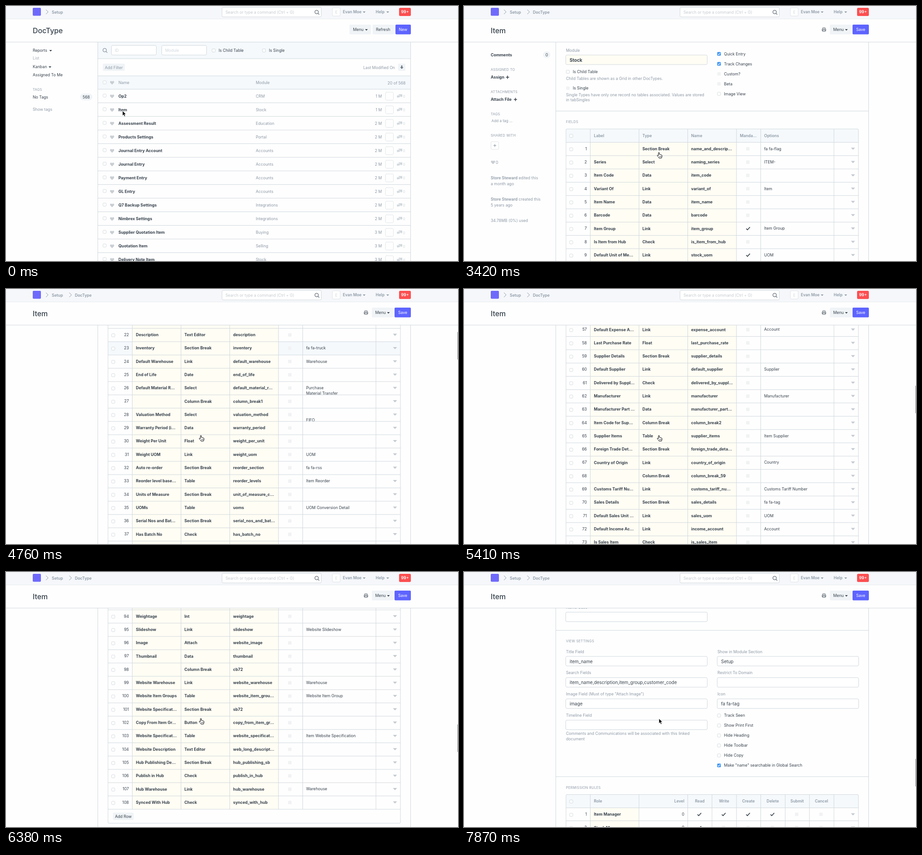
Animation, 997 px wide and 562 px high, one loop 8 s. Source, as an HTML page:

```html
<!DOCTYPE html>
<html lang="en">
<head>
<meta charset="utf-8">
<title>Item list and form</title>
<style>
html, body { margin: 0; width: 100%; height: 100%; overflow: hidden; background: #fefefe; }
svg { display: block; }
text { font-family: Inter, "Open Sans", sans-serif; white-space: pre; }
</style>
</head>
<body>
<svg id="stage" width="997" height="562" viewBox="0 0 997 562"></svg>
<script>
const INK = '#36414c', MUTED = '#8d99a6', PALE = '#d1d8dd', TINT = '#f5f9fc', GREY = '#f0f4f7', CREAM = '#fffdf4', BLUE = '#5e64ff';
const DURATION = 8000, ROW = 29.3, TABLE_TOP = 300.5, LOWER_TOP = 3608;

// y is the middle of the capital letters
function text(x, y, str, { fill = INK, size = 8.7, weight = 400, anchor = 'start', space = 0 } = {}) {
  return `<text x="${x}" y="${(y + size * .364).toFixed(2)}" font-size="${size}" font-weight="${weight}" fill="${fill}" text-anchor="${anchor}" letter-spacing="${space}">${str}</text>`;
}
const muted = (x, y, str, more) => text(x, y, str, { fill: MUTED, ...more });
const bold = (x, y, str, more) => text(x, y, str, { weight: 700, size: 8.85, ...more });
const caps = (x, y, str) => muted(x, y, str, { size: 7.4, space: .35 });
const rect = (x, y, w, h, fill = 'none', stroke = 'none', r = 0, more = '') =>
  `<rect x="${x}" y="${y}" width="${w}" height="${h}" rx="${r}" fill="${fill}" stroke="${stroke}" ${more}/>`;
const path = (x, y, d, fill = 'none', stroke = 'none', width = 1) =>
  `<path transform="translate(${x} ${y})" d="${d}" fill="${fill}" stroke="${stroke}" stroke-width="${width}"/>`;
const hLine = (y, x1 = 203, x2 = 893, color = PALE) => path(x1, y, `M0 0H${x2 - x1}`, 'none', color);
const vLine = (x, y1, y2) => path(x, y1, `M0 0V${y2 - y1}`, 'none', PALE);
const group = (id, body, more = '') => `<g id="${id}" ${more}>${body}</g>`;

const caret = (x, y, fill = INK) => path(x, y, 'M-3-1.5H3L0 1.8Z', fill);
const chevron = x => path(x, 13, 'M-2.5-5L2.5 0L-2.5 5', 'none', MUTED);
const plus = (x, y, fill = INK) => path(x, y, 'M-3.5 0H3.5M0-3.5V3.5', 'none', fill, 1.6);
const tick = (x, y) => path(x, y, 'M-4 .3L-1.2 3L4.2-3', 'none', INK, 1.7);
const box = (x, y) => rect(x - 3.5, y - 3.5, 7, 7, '#fff', '#cbd1d6', 1.5, 'stroke-width=".8"');
const offBox = (x, y) => rect(x - 3.8, y - 3.8, 7.6, 7.6, '#f1f2f3', 'none', 1.5);
const onBox = (x, y) => rect(x - 4, y - 4, 8, 8, '#3b94f5', 'none', 1.5) + path(x, y, 'M-2.2 .2L-.6 1.9L2.4-1.9', 'none', '#fff', 1.2);
const heart = (x, y) => path(x, y, 'M0 4.3L-4 .2C-6-2.4-2.4-5.6 0-2.6C2.4-5.6 6-2.4 4 .2Z', '#c8ced3');
const glass = (x, y, color = '#6c7680') => path(x, y, 'M2.3 2.3L5 5M3.1-.8A3.9 3.9 0 1 1-4.7-.8A3.9 3.9 0 1 1 3.1-.8', 'none', color, 1.3);
const bubbles = (x, y) => path(x, y, 'M-2-4H6V1H4.5V3L2.5 1H-2Z', PALE) + path(x, y, 'M-6-1.5H1V3H-2.5L-4.5 5V3H-6Z', PALE, '#fff', .6);
const button = (x, y, w, h, label, tx, fill = GREY, color = INK) =>
  rect(x, y, w, h, fill, 'none', 2) + text(tx, y + h / 2, label, { fill: color });
const input = (x, y, w, value = '', fill = '#fff', weight = 400) =>
  rect(x, y, w, 21, fill, PALE, 2.5) + text(x + 8.5, y + 11, value, { size: 9.95, weight });
const field = (x, y, label, value) => muted(x, y, label) + input(x - .5, y + 10.5, 312, value);
const check = (x, y, label, mark = box) => mark(x, y) + text(x + 11, y, label);

function navbar() {
  return rect(0, 0, 997, 29, '#f5f7fa') + hLine(28.5, 0, 997, '#e9edf1')
    + rect(59, 4, 18, 17.5, '#6f69fb', 'none', 2)
    + chevron(90.5) + muted(101, 13.5, 'Setup', { weight: 600 })
    + group('crumb', chevron(142) + muted(152, 13.5, 'DocType', { weight: 600 }))
    + rect(476.5, 3, 219, 21, '#fff', PALE, 2.5) + text(484, 13.5, 'Search or type a command (Ctrl + G)', { fill: '#c4cad0' }) + glass(686, 14)
    + rect(720, 4, 17, 18, '#fff', '#dfe3e6', 2) + text(728.5, 13.5, 'E', { fill: PALE, anchor: 'middle' })
    + muted(743, 13, 'Evan Moe', { weight: 600 }) + caret(790, 13.5, MUTED)
    + muted(815.5, 13, 'Help', { weight: 600 }) + caret(842, 13.5, MUTED)
    + rect(867, 4, 26, 18, '#fc4f51', 'none', 2.5) + text(880, 13, '99+', { fill: '#fff', weight: 600, anchor: 'middle' });
}

const title = str => text(59, 54.5, str, { size: 15.8, weight: 500 });

function pageHead() {
  return rect(0, 28, 997, 51.5, '#fefefe') + hLine(79.5, 0, 997)
    + group('listHead', title('DocType')
      + button(757.5, 41, 47.5, 21.5, 'Menu', 765.5) + caret(795, 52.5)
      + button(808.5, 41, 47, 21.5, 'Refresh', 816)
      + button(859, 41, 34, 21.5, 'New', 866.5, BLUE, '#fff'))
    + group('formHead', title('Item')
      + path(794, 52, 'M-2.5-1V-4H2.5V-1M-2.5 2.5H-4V-1H4V2.5H2.5M-2.5 1H2.5V4H-2.5Z', 'none', '#5f6973', 1.1)
      + button(807, 41, 46.5, 21.5, 'Menu', 814.5) + caret(843.5, 52.5)
      + button(857, 41, 36, 21.5, 'Save', 865, BLUE, '#fff'));
}

const LIST = `Op2|CRM|1
Item|Stock|1
Assessment Result|Education|2
Products Settings|Portal|2
Journal Entry Account|Accounts|2
Journal Entry|Accounts|2
Payment Entry|Accounts|2
GL Entry|Accounts|2
Q7 Backup Settings|Integrations|2
Nimbrex Settings|Integrations|2
Supplier Quotation Item|Buying|3
Quotation Item|Selling|3
Delivery Note Item|Stock|3`.split('\n').map(line => line.split('|'));

function listPage() {
  const side = text(59, 97.5, 'Reports') + caret(98.5, 98.5) + muted(59, 115, 'List', { fill: '#a3adb7' })
    + text(59, 134, 'Kanban') + caret(97, 134.5) + text(59, 151.5, 'Assigned To Me')
    + caps(59, 184, 'TAGS') + text(59, 200.5, 'No Tags')
    + rect(163.5, 193, 27, 15, GREY, 'none', 7.5) + text(177, 200.5, '568', { anchor: 'middle' })
    + muted(59, 227.5, 'Show tags');
  const filters = rect(203, 80, 690, 36, TINT) + glass(218.5, 98, MUTED)
    + rect(232.5, 87, 99, 21, '#fff', PALE, 2.5) + text(240, 98, 'ID', { fill: PALE })
    + rect(343.5, 87, 99, 21, '#fff', PALE, 2.5) + text(351, 98, 'Module', { fill: PALE })
    + check(458, 98, 'Is Child Table') + check(569, 98, 'Is Single') + hLine(116)
    + rect(213.5, 127, 48.5, 16, GREY, 'none', 2) + muted(218, 135.5, 'Add Filter')
    + muted(858, 135.5, 'Last Modified On', { anchor: 'end' })
    + rect(865, 127, 16, 16, GREY, 'none', 2) + path(873, 135, 'M-1.3-4H1.3V-.3H3.8L0 3.8L-3.8-.3H-1.3Z', '#6c7680');
  const header = rect(203, 154, 690, 29, TINT) + hLine(154) + hLine(183.3) + box(217.5, 168.3) + heart(234, 169)
    + muted(248, 169, 'Name') + muted(551, 169, 'Module') + muted(881.5, 169.5, '20 of 568', { anchor: 'end' });
  const rows = LIST.map(([name, module, age], i) => {
    const y = 198.5 + 30.03 * i;
    return box(217.5, y - 1) + heart(234, y + .5) + bold(248, y + .3, name) + muted(551, y + .3, module)
      + muted(829, y + .3, age + ' M', { anchor: 'end' })
      + rect(837, y - 8.5, 17.5, 17.5, 'none', PALE, 2.5, 'stroke-dasharray="2 1"')
      + bubbles(868, y) + text(878, y + .8, '0', { fill: PALE, size: 8, anchor: 'middle' }) + hLine(y + 14.8);
  }).join('');
  return side + filters + header + group('listHover', rect(203, 213.8, 690, 29, TINT)) + rows + vLine(202.5, 80, 562) + vLine(892.5, 80, 562);
}

const TYPES = { S: 'Section Break', C: 'Column Break', L: 'Link', D: 'Data', K: 'Check', T: 'Table', F: 'Float', O: 'Select', E: 'Text Editor', M: 'Currency', I: 'Int', A: 'Attach', G: 'Attach Image', B: 'Button', Y: 'Date', X: 'Small Text' };

// label|type|name|options; an empty name follows from the label, "/" breaks a line
const FIELDS = `|S|name_and_descrip...|fa fa-flag
Series|O|naming_series|ITEM-
Item Code|D
Variant Of|L||Item
Item Name|D
Barcode|D
Item Group|L||Item Group
Is Item from Hub|K
Default Unit of Me...|L|stock_uom|UOM
|C|column_break0
Disabled|K
Maintain Stock|K|is_stock_item
Include Item In M...|K|include_item_in_m...
Opening Stock|F
Valuation Rate|M
Standard Selling ...|M|standard_rate
Is Fixed Asset|K
Asset Category|L||Asset Category
Image|G
Description|S|section_break_11
Brand|L||Brand
Description|E
Inventory|S||fa fa-truck
Default Warehouse|L||Warehouse
End of Life|Y
Default Material R...|O|default_material_r...|Purchase/Material Transfer
|C|column_break1
Valuation Method|O||/FIFO
Warranty Period (i...|D|warranty_period
Weight Per Unit|F
Weight UOM|L||UOM
Auto re-order|S|reorder_section|fa fa-rss
Reorder level base...|T|reorder_levels|Item Reorder
Units of Measure|S|unit_of_measure_c...
UOMs|T||UOM Conversion Detail
Serial Nos and Bat...|S|serial_nos_and_bat...
Has Batch No|K
Automatically Crea...|K|create_new_batch
Batch Number Series|D
Retain Sample|K
Max Sample Quan...|I|sample_quantity
|C|column_break_37
Has Serial No|K
Serial Number Ser...|D|serial_no_series
Variants|S|variants_section
Has Variants|K
Variant Based On|O||Item Attribute
Attributes|T||Item Variant Attribute
Purchase Details|S||fa fa-shopping-cart
Is Purchase Item|K
Default Purchase ...|L|purchase_uom|UOM
Minimum Order Qty|F|min_order_qty
Safety Stock|F
|C|purchase_details_cb
Lead Time in days|I|lead_time_days
Default Buying Co...|L|buying_cost_center|Cost Center
Default Expense A...|L|expense_account|Account
Last Purchase Rate|F
Supplier Details|S
Default Supplier|L||Supplier
Delivered by Suppl...|K|delivered_by_suppl...
Manufacturer|L||Manufacturer
Manufacturer Part ...|D|manufacturer_part...
Item Code for Sup...|C|column_break2
Supplier Items|T||Item Supplier
Foreign Trade Det...|S|foreign_trade_deta...
Country of Origin|L||Country
|C|column_break_59
Customs Tariff Nu...|L|customs_tariff_nu...|Customs Tariff Number
Sales Details|S||fa fa-tag
Default Sales Unit ...|L|sales_uom|UOM
Default Income Ac...|L|income_account|Account
Is Sales Item|K
|C|column_break3
Default Selling Co...|L|selling_cost_center|Cost Center
Max Discount (%)|F|max_discount
Customer Details|S
Customer Items|T||Item Customer Detail
Item Tax|S|item_tax_section_b...|fa fa-money
Taxes|T||Item Tax
Inspection Criteria|S||fa fa-search
Inspection Require...|K|inspection_require...
Inspection Require...|K|inspection_require...
Quality Parameters|T||Item Quality Inspection
Manufacturing|S||fa fa-cogs
Default BOM|L||BOM
Supply Raw Mater...|K|is_sub_contracted...
|C|column_break_74
Customer Code|D
Website|S|website_section|fa fa-globe
Show in Website|K
Show in Website (...|K|show_variant_in_w...
Route|X
Weightage|I
Slideshow|L||Website Slideshow
Image|A|website_image
Thumbnail|D
|C|cb72
Website Warehouse|L||Warehouse
Website Item Groups|T|website_item_grou...|Website Item Group
Website Specificat...|S|sb72
Copy From Item Gr...|B|copy_from_item_gr...
Website Specificat...|T|website_specificat...|Item Website Specification
Website Description|E|web_long_descript...
Hub Publishing De...|S|hub_publishing_sb
Publish in Hub|K
Hub Warehouse|L||Warehouse
Synced With Hub|K`.split('\n').map(line => line.split('|'));

const slug = label => label.toLowerCase().replace(/ /g, '_');
const headCell = (x, y, str, anchor) => muted(x, y, str, { weight: 600, anchor });
const rowStart = (y, n) => box(236.5, y + 1.2) + text(271, y, n, { anchor: 'end' });
const rowArrow = y => path(858, y, 'M-4.5-2.2H4.5L0 2.6Z', '#c3cad0');

function fieldTable() {
  const bottom = TABLE_TOP + ROW * FIELDS.length, end = bottom + 30.8;
  const rows = FIELDS.map(([label, type, name, options = ''], i) => {
    const top = TABLE_TOP + ROW * i, y = top + 14;
    const lines = options.split('/').map((str, k) => text(8, 14 + 12 * k, str)).join('');
    return rowStart(y, i + 1) + bold(286.5, y, label) + bold(393.5, y, TYPES[type]) + bold(501, y, name || slug(label))
      + (i === 6 || i === 8 ? tick(626.5, y) : offBox(626, y + .3))
      + `<svg x="654" y="${top}" width="161" height="${ROW}">${lines}</svg>`
      + rowArrow(y) + hLine(top + ROW, 225, 870);
  }).join('');
  const heads = [['Label', 286.5], ['Type', 393.5], ['Name', 501], ['Manda...', 608.5], ['Options', 662]];
  return rect(225, 271, 645, 29.5, TINT) + box(236.5, 286.3) + heads.map(([s, x]) => headCell(x, 285.5, s)).join('')
    + group('rowHover', rect(225, TABLE_TOP + ROW * 22, 645, ROW, TINT))
    + rect(278.5, TABLE_TOP, 322.5, bottom - TABLE_TOP, CREAM) + hLine(TABLE_TOP, 225, 870) + rows
    + [278.5, 386, 493.5, 601, 654.5, 816].map(x => vLine(x, 271, bottom)).join('')
    + rect(225, 271, 645, end - 271, 'none', PALE, 2)
    + button(236, bottom + 7.5, 45.5, 16, 'Add Row', 240.5);
}

function formSide() {
  const edit = (y, verb, when) => muted(59, y, `<tspan font-weight="600">Store Steward</tspan> ${verb} this`) + muted(59, y + 12.5, when);
  return bold(59, 107.5, 'Comments') + rect(174.5, 100, 16, 15, GREY, 'none', 7.5) + text(182.5, 107.5, '0', { anchor: 'middle' })
    + caps(59, 140, 'ASSIGNED TO') + bold(59, 156.5, 'Assign') + plus(96, 157)
    + caps(59, 189, 'ATTACHMENTS') + bold(59, 205.5, 'Attach File') + plus(113.5, 206)
    + caps(59, 238, 'TAGS') + muted(60.5, 253, 'Add a tag ...', { size: 8.2 })
    + caps(59, 285, 'SHARED WITH') + rect(59.5, 299, 17, 17, 'none', PALE, 2, 'stroke-dasharray="2 1"') + path(68, 307.5, 'M-3 0H3M0-3V3', 'none', MUTED, 1.2)
    + heart(64, 344.5) + muted(70, 344.5, '0')
    + edit(379, 'edited', 'a month ago') + edit(426, 'created', '5 years ago') + muted(59, 472.5, '34.78MB (0%) used');
}

function formTop() {
  return muted(225, 98, 'Module') + input(224.5, 108, 312, 'Stock', CREAM, 700)
    + check(229, 145, 'Is Child Table') + muted(225, 159.5, 'Child Tables are shown as a Grid in other DocTypes.')
    + check(229, 181, 'Is Single', offBox)
    + muted(225, 195.5, 'Single Types have only one record no tables associated. Values are stored') + muted(225, 207, 'in tabSingles')
    + [['Quick Entry', onBox], ['Track Changes', onBox], ['Custom?', offBox], ['Beta', offBox], ['Image View', box]]
      .map(([label, mark], i) => check(562.5, 105.5 + 22 * i, label, mark)).join('')
    + hLine(231.5) + caps(225, 255.5, 'FIELDS');
}

function permissions() {
  const rights = ['Read', 'Write', 'Create', 'Delete', 'Submit', 'Cancel'];
  const row = (n, role, granted) => {
    const y = 504.7 + ROW * n;
    return rowStart(y, n) + bold(286.5, y, role) + text(486, y, '0', { anchor: 'end' })
      + rights.map((_, i) => (i < granted ? tick : offBox)(519 + 53.7 * i, y)).join('') + rowArrow(y) + hLine(y + 14.3, 225, 870);
  };
  return caps(225, 475.5, 'PERMISSION RULES') + rect(225, 490.5, 645, 29, TINT) + rect(278.5, 519.5, 107.5, 90, CREAM)
    + rect(225, 490.5, 645, 120, 'none', PALE, 2) + hLine(519.7, 225, 870)
    + box(236.5, 505.8) + headCell(286.5, 505, 'Role') + headCell(486, 505, 'Level', 'end')
    + rights.map((s, i) => headCell(520 + 53.7 * i, 505, s, 'middle')).join('')
    + row(1, 'Item Manager', 4) + row(2, 'Stock Manager', 1)
    + [278.5, 386, 493.5, 547, 601, 654.5, 708.5, 762, 816].map(x => vLine(x, 490.5, 610)).join('');
}

function formLower() {
  const naming = ['Naming Options:', '1. field:[fieldname] - By Field', '2. naming_series: - By Naming Series (field called naming_series must be',
    '3. Prompt - Prompt user for a name', '4. [series] - Series by prefix (separated by a dot)'];
  return hLine(-91) + caps(225, -67, 'NAMING') + field(225, -44, 'Auto Name', 'field:item_code')
    + naming.map((line, i) => muted(225, -4 + 12 * i, line)).join('')
    + field(225, 78, 'Name Case', '') + hLine(128.5) + caps(225, 152.5, 'VIEW SETTINGS')
    + field(225, 175.5, 'Title Field', 'item_name') + field(225, 222.3, 'Search Fields', 'item_name,description,item_group,customer_code')
    + field(225, 269.2, 'Image Field (Must of type "Attach Image")', 'image') + field(225, 316, 'Timeline Field', '')
    + muted(225, 355.5, 'Comments and Communications will be associated with this linked') + muted(225, 367.5, 'document')
    + field(559, 175.5, 'Show in Module Section', 'Setup') + field(559, 222.3, 'Restrict To Domain', '') + field(559, 269.2, 'Icon', 'fa fa-tag')
    + ['Track Seen', 'Show Print First', 'Hide Heading', 'Hide Toolbar', 'Hide Copy', 'Make "name" searchable in Global Search']
      .map((label, i) => check(562.5, 316.3 + 22 * i, label, i === 5 ? onBox : box)).join('')
    + hLine(451) + permissions();
}

const stage = document.getElementById('stage');
stage.innerHTML = rect(0, 0, 997, 562, '#fefefe')
  + group('list', listPage())
  + group('form', group('formBody', formSide() + formTop() + fieldTable() + group('lower', formLower(), `transform="translate(0 ${LOWER_TOP})"`))
    + vLine(202.5, 80, 562) + vLine(892.5, 80, 562) + rect(996, 0, 3, 61, '#74797e', 'none', 1, 'id="thumb"'))
  + pageHead() + navbar()
  + group('arrow', path(0, 0, 'M0 0V10.8L2.5 8.5L4.2 12.6L6.2 11.8L4.5 7.8H7.8Z', '#000', '#fff', .8))
  + group('hand', path(0, 0, 'M-1.2 7V1C-1.2-.6 1-.6 1 1V4.2C1.4 3.4 3 3.6 3 4.8C3.6 4.1 5 4.4 5 5.6C5.8 5 6.8 5.5 6.8 6.6V8.6C6.8 10 6 10.6 5.6 12.2H.2C-.4 10.6-2.2 9-3.6 7.2C-4.4 5.8-2.6 5.2-1.2 7Z', '#fff', '#000', 1)
    + path(0, 0, 'M1.4 7.6V10.2M3.2 7.6V10.2M5 7.6V10.2', 'none', '#000', .7));
const el = Object.fromEntries([...stage.querySelectorAll('[id]')].map(node => [node.id, node]));

const CURSOR = [[0, 257, 231], [750, 310, 233], [960, 362, 235], [1260, 326, 233], [1410, 294, 231],
  [1860, 287, 231], [2010, 280, 231], [2160, 275, 231], [3240, 390, 300], [3420, 430, 323]];
const TICKS = [4010, 4190, 4380, 4570, 4760, 4930, 5080, 5240, 5410, 5590, 5750, 5910, 6080, 6230, 6380, 6560, 6720, 6880, 7030, 7180, 7360, 7530, 7700, 7870];
const SCROLL = [[3900, 0], [4190, 160], [4570, 630], [4760, 829], [5080, 1320], [5410, 1866], [5910, 2480], [6380, 2942], [6880, 3280], [7360, 3500], [7870, LOWER_TOP]];

function scrollAt(t) {
  const now = TICKS.findLast(tick => tick <= t);
  if (!now) return 0;
  const i = Math.max(1, SCROLL.findIndex(([time]) => time >= now));
  const [t0, a] = SCROLL[i - 1], [t1, b] = SCROLL[i];
  return a + (b - a) * (now - t0) / (t1 - t0);
}

const show = (node, on) => node.setAttribute('display', on ? 'inline' : 'none');

function render(t) {
  const scroll = scrollAt(t), listed = t < 2910, loaded = t >= 3240;
  show(el.list, listed);
  show(el.listHead, listed);
  show(el.listHover, t >= 750);
  show(el.crumb, t >= 2760);
  show(el.form, loaded);
  show(el.formHead, loaded);
  show(el.rowHover, t >= 4570 && t < 4930);
  show(el.thumb, scroll > 0);
  el.formBody.setAttribute('transform', `translate(0 ${-scroll.toFixed(2)})`);
  el.thumb.setAttribute('y', (scroll * .1141).toFixed(2));

  const [, x, y] = CURSOR.findLast(([time]) => time <= t);
  const pointing = t >= 750 && (listed || loaded) && scroll < 3167;
  show(el.hand, pointing);
  show(el.arrow, !pointing);
  el.hand.setAttribute('transform', `translate(${x} ${y})`);
  el.arrow.setAttribute('transform', `translate(${x} ${y})`);
}

const start = performance.now();
function frame() {
  render((performance.now() - start) % DURATION);
  requestAnimationFrame(frame);
}
render(0);
requestAnimationFrame(frame);
</script>
</body>
</html>
```
